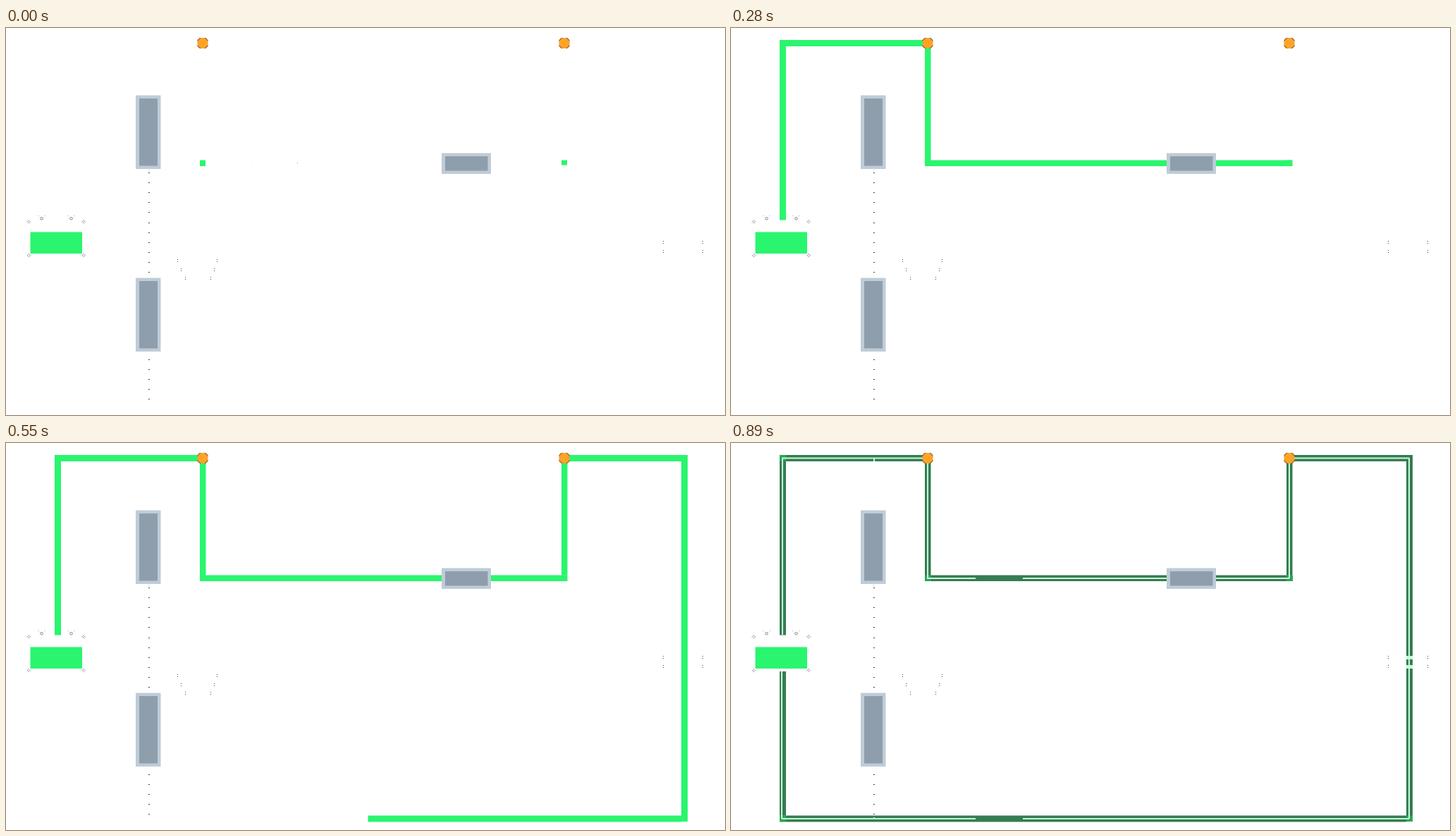
These frames come from a looping animation (1020 by 549 pixels, 920 ms). An HTML page with a canvas:

```html
<!DOCTYPE html>
<html lang="en">
<head>
<meta charset="utf-8">
<title>Circuit</title>
<style>
html, body { margin: 0; width: 100%; height: 100%; overflow: hidden; background: #fff; }
canvas { display: block; }
</style>
</head>
<body>
<canvas id="stage" width="1020" height="549"></canvas>
<script>
const c = document.getElementById('stage').getContext('2d');
const GREEN = '#2af56e', INK = '#444';
const LOOP = 920;

// Wire pieces in drawing order: x, y, signed width, signed height, ticks
const wires = [
  [69, 272.5, 9, -255.5, 2], [78, 17, 205, 9, 1], [275, 26, 8.5, 170, 1],
  [283, 187.5, 513.5, 8.5, 3], [788, 187.5, 8.5, -170.5, 1], [796, 17, 171, 9, 3],
  [958, 26, 9, 511, 3], [958, 528.5, -889, 9, 4], [69, 528.5, 9, -204.5, 2]
];

// Pale centre lines of the fading wires
const cores = [
  [72, 21, 2, 251], [72, 20.5, 207, 2], [278, 21, 2, 171], [278, 191, 69, 2],
  [414, 191, 378, 2], [791, 21, 2, 171], [792, 20.5, 170, 2], [961, 21, 2, 512],
  [72, 532, 275, 2], [414, 532, 548, 2], [71, 324, 2, 209],
  [958, 302, 9, 5], [958, 315, 9, 5], [202, 22, 2, 4], [202, 531, 2, 3]
];
const corners = [[69, 17], [69, 528.5], [275, 187.5], [788, 187.5], [958, 528.5]];

function box(color, x, y, w, h) {
  c.fillStyle = color;
  c.fillRect(x, y, w, h);
}

function ticksAt(t) {
  if (t >= 190) return Math.min(20, 4 + Math.floor((t - 190) / 30));
  return [30, 60, 130].filter(s => t >= s).length;
}

function drawWires(ticks) {
  for (const [x, y, w, h, n] of wires) {
    const p = Math.max(0, Math.min(1, ticks / n));
    if (p) Math.abs(w) > Math.abs(h) ? box(GREEN, x, y, w * p, h) : box(GREEN, x, y, w, h * p);
    ticks -= n;
  }
}

function drawFade(dark, pale, corner) {
  wires.forEach(w => box(dark, ...w.slice(0, 4)));
  corners.forEach(([x, y]) => box(corner, x, y, 9, 8.5));
  cores.forEach(r => box(pale, ...r));
}

function block(x, y, w, h) {
  box('#bfccd7', x, y, w, h);
  box('#8e9eac', x + 5, y + 4.5, w - 9.5, h - 9);
}

function dot(x, y, w = 1) { box(INK, x, y, w, 1); }

function node(x) {
  c.fillStyle = '#ffa229';
  c.beginPath();
  c.roundRect(x - 7.5, 14, 15, 15, 5);
  c.fill();
  c.strokeStyle = '#403828';
  c.lineWidth = 0.8;
  for (let i = 0; i < 4; i++) {
    const a = Math.PI * (i / 2 + 0.25);
    c.beginPath();
    c.arc(x, 21.5, 8, a - 0.4, a + 0.4);
    c.stroke();
  }
}

function drawMarks() {
  for (let i = 0; i < 11; i++) dot(202, Math.round(205 + i * 14.1), 2);
  for (let i = 0; i < 5; i++) dot(202, Math.round(469.5 + i * 14.1), 2);
  box('#bbb', 202, 201, 1, 1);
  box('#ddd', 348, 191, 1, 1);
  box('#888', 413, 191, 1, 1);
  for (const [l, r, y] of [[243, 299, 328], [248, 295, 341], [254, 290, 353], [932, 988, 302], [932, 988, 315]])
    for (const x of [l, r]) { dot(x, y); dot(x, y + 3); }
}

function drawLamp() {
  box(GREEN, 34.5, 289.5, 73.5, 30.5);
  c.strokeStyle = '#555';
  c.lineWidth = 0.7;
  for (const x of [50.5, 92.5]) {
    c.beginPath();
    c.arc(x, 270.3, 1.8, 0, 7);
    c.stroke();
    box('#999', x - 5, 266, 1, 1);
    box('#999', x + 4, 266, 1, 1);
  }
  for (const sx of [-1, 1]) for (const sy of [-1, 1])
    for (const d of [0, 2.5]) {
      const x = 71.2 + sx * (38 + d / 1.4), y = 298.7 + sy * (23 + d / 1.4);
      c.beginPath();
      c.moveTo(x - 1.7 * sx, y + 1.7 * sy);
      c.lineTo(x + 1.7 * sx, y - 1.7 * sy);
      c.stroke();
    }
}

function draw(t) {
  box('#fff', 0, 0, 1020, 549);
  drawMarks();
  box(GREEN, 275, 187.5, 8, 8.5);
  box(GREEN, 788, 187.5, 8, 7);
  if (t < 860) drawWires(ticksAt(t));
  else if (t < 890) drawFade('#2fb75e', '#78fca0', '#2bdc67');
  else drawFade('#367c52', '#c5fbd6', '#2ba458');
  block(184, 95.5, 35.5, 104.5);
  block(184, 354.5, 35.5, 104.5);
  block(618, 177.5, 70, 29.5);
  drawLamp();
  node(279);
  node(792);
}

function loop() {
  draw(performance.now() % LOOP);
  requestAnimationFrame(loop);
}
loop();
</script>
</body>
</html>
```
